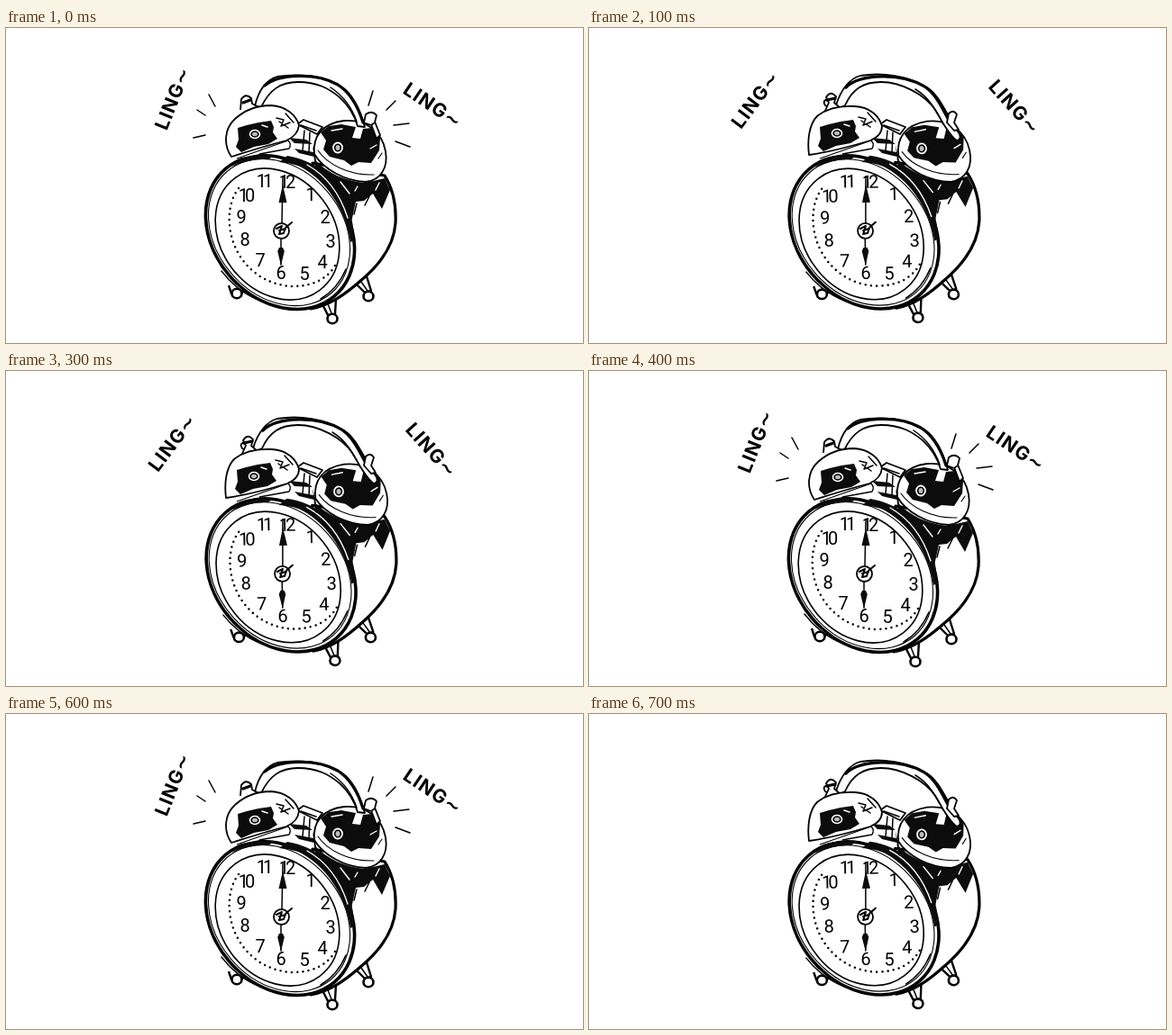
Write an HTML page that moves like this. It is 640 by 350 pixels and loops after 1.2 s.

```html
<!DOCTYPE html>
<html lang="en">
<head>
<meta charset="utf-8">
<title>Ringing alarm clock</title>
<style>
  html, body { margin: 0; width: 100%; height: 100%; overflow: hidden; background: #fff; }
  svg { display: block; width: 100%; height: 100%; }
  .line { fill: none; stroke: #000; stroke-width: 1.5; stroke-linecap: round; stroke-linejoin: round; }
  .shell { fill: #fff; stroke: #000; stroke-width: 1.8; stroke-linejoin: round; }
  .bold { stroke-width: 3.2; }
  .ink { fill: #0c0c0c; }
  .gap { fill: none; stroke: #fff; stroke-width: 1.4; stroke-linecap: round; }
  .dots { fill: none; stroke: #000; stroke-width: 2.5; stroke-linecap: round; stroke-dasharray: 0 6.2; }
  text { fill: #000; text-anchor: middle; }
  #numerals { font: 400 20px Roboto, "Liberation Sans", sans-serif; letter-spacing: -4px; }
  .ling { font: 700 21px Inter, "Open Sans", sans-serif; letter-spacing: 1.2px; }
  .wave { font: 700 21px "DejaVu Sans", sans-serif; }
</style>
</head>
<body>
<svg viewBox="0 0 640 350">
  <g id="body">
    <g id="feet"></g>
    <!-- casing side -->
    <path class="shell bold" d="M340 150L420 164C430 180 433 198 432 217C430 243 414 264 392 282C377 295 360 308 338 312Z"/>
    <path class="ink" d="M342 146C356 161 376 170 398 172L420 167L426 180L417 201L407 184L397 192L388 193L383 216C378 196 366 176 347 164Z"/>
    <path class="gap" d="M371 171L381 184M414 172L410 180M390 176L387 181"/>
    <path class="line" d="M389 195L386 207M403 187L398 197"/>
    <!-- front rim -->
    <ellipse class="shell" style="stroke-width:3.6" rx="93" ry="74" transform="translate(304 227) rotate(49.4)"/>
    <ellipse class="line" style="stroke-width:1.1" rx="89" ry="70" transform="translate(303 227) rotate(49.6)"/>
    <path class="ink" d="M250 154C263 144 279 140 298 141L291 146C276 145 264 149 250 154ZM312 142C345 147 369 170 379 198C384 212 386 222 386 236L382 238C378 207 359 173 330 156C323 152 314 150 303 149Z"/>
    <path class="gap" d="M334 152C357 165 371 186 379 211"/>
    <path class="line" d="M239 270C255 291 276 304 302 309M377 268C371 282 361 294 349 301"/>
    <ellipse class="shell" style="stroke-width:1.6" rx="78" ry="63" transform="translate(301 229) rotate(53)"/>
    <path class="dots" d="M258 178C245 195 245 222 254 243C266 270 290 286 318 287C340 287 356 279 365 264"/>
    <g id="numerals"></g>
    <!-- hands -->
    <path class="line" d="M306 217L307 165M305 232L305 263"/>
    <path class="ink" d="M307 174L311.500 194L302.500 194ZM305 264L301.200 248L303 244L307 244L308.800 248Z"/>
    <circle class="shell" cx="305.500" cy="225.500" r="8.500"/>
    <path class="line" style="stroke-width:2" d="M300 223L306 220L303 229L308 228L310 222L317 216M303 225L310 223"/>
  </g>

  <!-- hammer and stand -->
  <path class="shell" d="M323 107L330 102L351 110L345 118Z"/>
  <path class="line" d="M327 108L344 114M331 114L329 136M337 116L336 138"/>
  <path class="ink" d="M314 122L333 124L340 129L320 128ZM320 134L341 138L346 144L325 139ZM340 130L345 151L354 160L343 157Z"/>
  <path class="shell" style="stroke-width:1.3" d="M256 145L313 125Q317 129 314 134L281 140"/>

  <g id="rightBell">
    <path class="shell" d="M342 140C340 120 351 106 375 103C399 101 417 115 421 137C424 155 416 169 399 171C376 170 352 157 342 140Z"/>
    <path class="ink" d="M349 116L358 109L372 107L388 110L384 122L393 123L396 112L406 111L415 122L414 136L405 150L391 149L383 153L375 147L359 143L352 135L355 125Z"/>
    <path class="line" style="stroke-width:1.1" d="M346 136C356 151 380 164 408 163M413 145L417 139"/>
    <path class="gap" d="M361 114L373 112M404 134L411 130"/>
    <ellipse class="shell" cx="368" cy="133" rx="5" ry="5.500" style="stroke:#fff;fill:#000"/>
    <ellipse cx="368" cy="133" rx="2.500" ry="3" fill="#bbb"/>
  </g>

  <g id="poseParts"></g>

  <path id="marks" class="line" d="M225 74L232 87M212 91L221 97M208 122L221 119M407 70L402 86M432 81L422 91M430 108L447 106M432 126L448 132"/>
  <text id="lingLeft" class="ling" y="7.500">LING<tspan class="wave">~</tspan></text>
  <text id="lingRight" class="ling" y="7.500">LING<tspan class="wave">~</tspan></text>
</svg>

<script>
const el = id => document.getElementById(id);
const path = (cls, d) => `<path class="${cls}" d="${d}"/>`;

const numerals = [
  ["12", 312, 171], ["11", 287, 170], ["10", 267, 186], ["9", 261, 210],
  ["8", 265, 235], ["7", 282, 258], ["6", 305, 272], ["5", 331, 273],
  ["4", 351, 260], ["3", 360, 237], ["2", 354, 210], ["1", 338, 185]
];
el("numerals").innerHTML = numerals
  .map(([n, x, y]) => `<text x="${x - 2}" y="${y + 7}">${n}</text>`).join("");

const foot = (x, y, leg) =>
  `<path class="shell" style="stroke-width:2.4" d="${leg}"/>` +
  `<ellipse class="shell" style="stroke-width:2.6" cx="${x}" cy="${y}" rx="5.5" ry="5.2"/>`;
el("feet").innerHTML =
  foot(256, 295, "M247 286L250 295L259 297L266 290") +
  foot(362, 323, "M348 301L357 319L365 318L366 300") +
  foot(402, 298, "M387 283L398 294L405 292L400 276") +
  path("line", "M356 304L361 317M394 282L401 292");

const leftBell = (dome, x, y) =>
  path("shell", dome) +
  `<g transform="translate(${x} ${y})">` +
  path("ink", "M-19 -7L-9 -10L4 -13L18 -15L21 -8L20 -2L25 5L15 11L-1 14L-15 20L-21 14L-18 6Z") +
  path("line", "M24 -18L32 -16L29 -9L39 -13M27 -14L37 -7M34 -23L43 -13") +
  path("gap", "M8 -10L14 -8") +
  `<ellipse rx="5.5" ry="4.5" fill="#000" stroke="#fff" stroke-width="1.6"/>` +
  `<ellipse rx="3" ry="2.2" fill="#bbb"/></g>`;

const poses = {
  tilted: {
    body: "", bell: "",
    words: ["translate(185 78) rotate(-68)", "translate(473.5 86) rotate(34)"],
    parts:
      path("shell", "M276 87C280 69 289 57 301 54C325 50 352 53 372 65C385 74 393 91 398 110L390 109C387 98 381 87 370 77C358 67 345 60 324 60C304 60 292 69 283 88Z") +
      path("line bold", "M287 64C302 51 344 49 368 63C382 72 390 86 396 105") +
      path("line", "M360 66C375 76 384 89 389 104") +
      path("shell", "M397 105L399 96Q406 91 411 97L409 105L405 108ZM405 107L411 123L415 119L409 104") +
      path("shell", "M260 91L261 79Q266 72 272 78L273 84L280 88") +
      path("line bold", "M263 83L271 80") +
      leftBell("M250 143C241 130 242 112 254 101C265 91 279 86 294 86C311 87 322 97 325 108C324 117 318 122 311 125C292 130 272 136 250 143Z", 276, 118)
  },
  upright: {
    body: "rotate(-1.1 300 170)", bell: "translate(1.2 0.5) rotate(-2 380 137)",
    words: ["translate(184.5 79.5) rotate(-53)", "translate(472 88) rotate(48)"],
    parts:
      path("shell", "M274 86C279 69 289 56 301 53C325 49 354 53 375 66C390 76 396 96 411 118Q413 124 408 125C399 119 392 104 384 91C373 74 346 60 324 60C304 60 292 68 284 86Q272 93 262 86Q258 80 266 79Z") +
      path("line bold", "M285 66C300 51 346 49 372 65C386 74 393 92 401 106") +
      path("line", "M362 68C377 77 385 91 393 107") +
      path("shell", "M397 105L399 95Q404 90 408 96L405 105L410 113L405 114Z") +
      path("shell", "M261 94L266 83L263 77Q268 69 274 76L272 83L280 90") +
      path("line bold", "M264 80L273 78") +
      leftBell("M244 141C242 125 244 107 253 98C264 89 279 86 295 87C312 88 322 98 325 109C325 117 319 122 312 125C289 132 266 138 244 141Z", 275, 117)
  }
};

const show = (id, on) => el(id).setAttribute("display", on ? "inline" : "none");
const STEP = 100, LOOP = 1200, RINGING_STEPS = 7;
let current = -1;

function render(time) {
  const step = Math.floor((time % LOOP) / STEP);
  if (step === current) return;
  current = step;
  const ringing = step < RINGING_STEPS;
  const tilted = ringing && step % 2 === 0;
  const { body, bell, words, parts } = tilted ? poses.tilted : poses.upright;
  el("body").setAttribute("transform", body);
  el("rightBell").setAttribute("transform", bell);
  el("poseParts").innerHTML = parts;
  show("marks", tilted);
  ["lingLeft", "lingRight"].forEach((id, i) => {
    show(id, ringing);
    el(id).setAttribute("transform", words[i]);
  });
}

const start = performance.now();
function tick() {
  render(performance.now() - start);
  requestAnimationFrame(tick);
}
tick();
</script>
</body>
</html>
```
